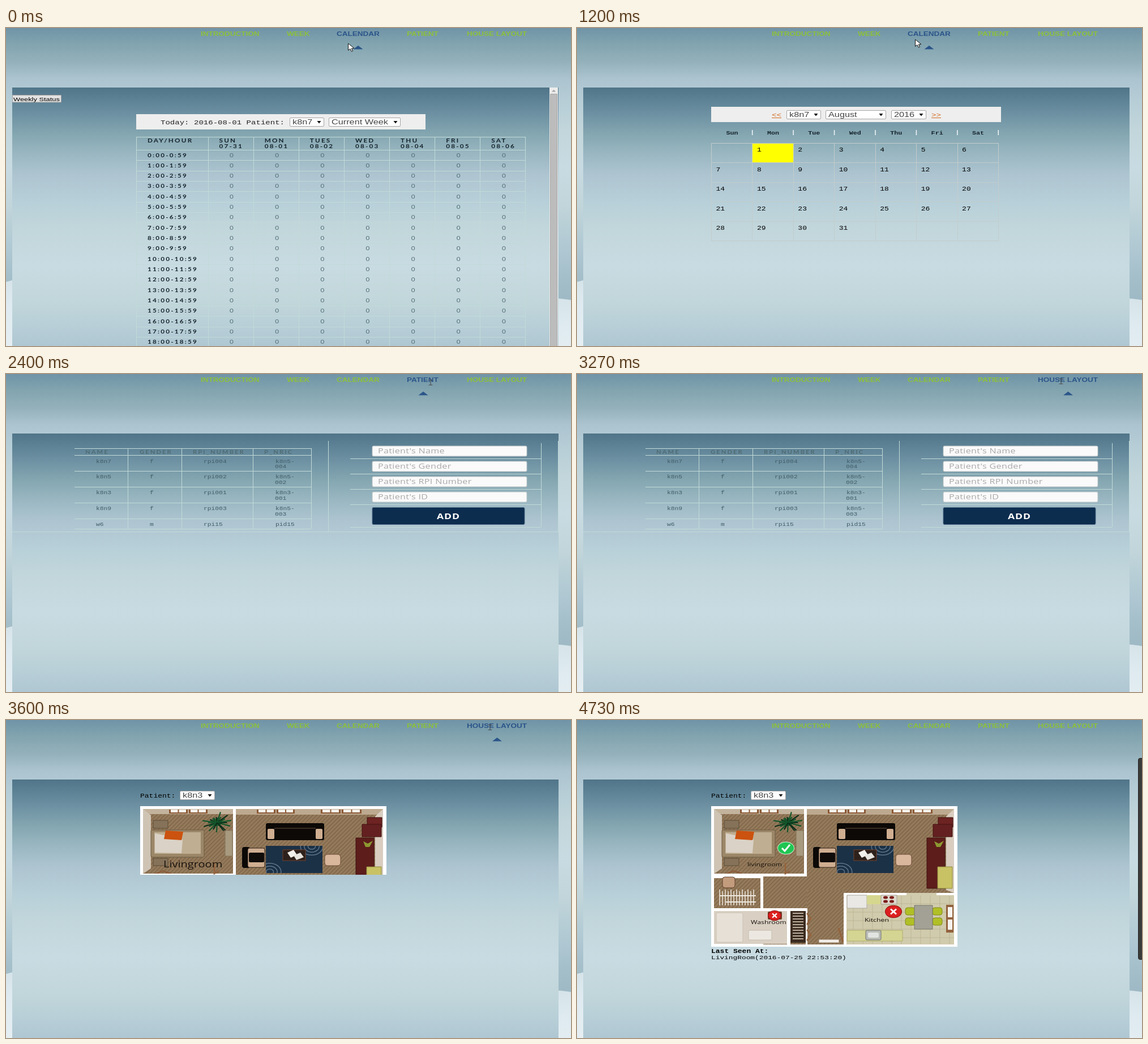
Animation of 998 by 561 pixels, one loop 5060 ms. Source, as an HTML page with a canvas:

```html
<!DOCTYPE html>
<html lang="en">
<head>
<meta charset="utf-8">
<title>Patient monitor</title>
<style>
html, body { margin: 0; width: 100%; height: 100%; overflow: hidden; }
canvas { display: block; width: 998px; height: 561px; }
</style>
</head>
<body>
<canvas id="stage" width="998" height="561"></canvas>
<script>
const ctx = document.getElementById('stage').getContext('2d');
const LOOP = 5060, TICKS_PER_MS = 0.015;
const STRETCH = 1.3;
const SANS = '"Liberation Sans", Arial, sans-serif';
const MONO = '"Liberation Mono", monospace';
const HUMAN = '"Open Sans", sans-serif';
const TABLE = 'Lato, sans-serif';
const LINE = '#c1dad7', SLATE = '#4f6b72', INK = '#14222a';

// Drawing helpers

function text(str, x, y, font, color = '#000', spacing = 0, align = 'left') {
  ctx.save();
  ctx.translate(x, y);
  ctx.scale(STRETCH, 1);
  ctx.font = font;
  ctx.fillStyle = color;
  ctx.letterSpacing = spacing + 'px';
  ctx.textAlign = align;
  ctx.fillText(str, 0, 0);
  ctx.restore();
}

function box(x, y, w, h, fill, stroke, radius = 0) {
  ctx.beginPath();
  ctx.roundRect(x, y, w, h, radius);
  if (fill) { ctx.fillStyle = fill; ctx.fill(); }
  if (stroke) { ctx.strokeStyle = stroke; ctx.lineWidth = 1; ctx.stroke(); }
}

const boxes = list => list.forEach(b => box(...b));

function poly(points, fill, stroke) {
  ctx.beginPath();
  points.forEach(([x, y]) => ctx.lineTo(x, y));
  ctx.closePath();
  if (fill) { ctx.fillStyle = fill; ctx.fill(); }
  if (stroke) { ctx.strokeStyle = stroke; ctx.lineWidth = 1; ctx.stroke(); }
}

function line(color, width, ...points) {
  ctx.beginPath();
  points.forEach(([x, y]) => ctx.lineTo(x, y));
  ctx.strokeStyle = color;
  ctx.lineWidth = width;
  ctx.stroke();
}

function ellipse(x, y, rx, ry, fill) {
  ctx.beginPath();
  ctx.ellipse(x, y, rx, ry, 0, 0, 7);
  ctx.fillStyle = fill;
  ctx.fill();
}

function vertical(stops) {
  const gradient = ctx.createLinearGradient(0, 0, 0, 561);
  stops.forEach(([y, color]) => gradient.addColorStop(y / 561, color));
  return gradient;
}

function select(x, y, w, label) {
  box(x + .5, y + .5, w - 1, 15, '#fff', '#a5a5a5', 1.5);
  text(label, x + 5, y + 12, '12.5px ' + SANS, '#444');
  const ax = x + w - 9;
  poly([[ax - 3.5, y + 6], [ax + 3.5, y + 6], [ax, y + 10.5]], '#111');
}

// Page parts

const sky = vertical([[0, '#7094a7'], [30, '#83a5b0'], [60, '#94b1bb'], [90, '#acc4d0'],
  [130, '#b7ced7'], [180, '#c2d6db'], [245, '#c8dbe2'], [315, '#c1d5da'],
  [355, '#b7ced6'], [400, '#adc6d1'], [450, '#a2bdc8'], [530, '#97b3bf']]);
const panelFill = vertical([[105, '#507589'], [130, '#5f8497'], [160, '#7396a6'],
  [190, '#86a8b2'], [225, '#9bb8c3'], [260, '#aec5d1'], [310, '#b8d0d9'],
  [350, '#c1d6db'], [420, '#c8dbe2'], [485, '#c1d6da'], [525, '#b8cfd8'], [561, '#afc7d2']]);

function cloud(x, top, rx, ry) {
  ctx.save();
  ctx.translate(x, top + ry);
  ctx.scale(rx, ry);
  const glow = ctx.createRadialGradient(0, 0, .4, 0, 0, 1);
  glow.addColorStop(0, '#e7eff2');
  glow.addColorStop(.6, '#dfebf1');
  glow.addColorStop(1, '#d6e4ea');
  ellipse(0, 0, 1, 1, glow);
  ctx.restore();
}

function background() {
  box(0, 0, 998, 561, sky);
  cloud(526, 486, 280, 190);
  cloud(103, 434, 265, 178);
  cloud(932, 475, 300, 199);
}

const links = [['INTRODUCTION', 344, 448], ['WEEK', 496, 536], ['CALENDAR', 584, 660],
  ['PATIENT', 708, 766], ['HOUSE LAYOUT', 814, 921]];

function nav(mouse) {
  for (const [label, left, right] of links) {
    const hover = mouse.y < 38 && mouse.x >= left && mouse.x <= right;
    text(label, left, 13.5, 'bold 10.4px ' + SANS, hover ? '#2b5589' : '#8cc03c');
    const mid = (left + right) / 2;
    if (hover) poly([[mid - 8.5, 37.5], [mid + 8.5, 37.5], [mid, 31]], '#2b5589');
  }
}

function weekView() {
  box(960, 105, 15, 456, '#ececec');
  box(961.5, 116.5, 12, 460, '#bcbcbc', '#a6a6a6');
  poly([[964, 112.5], [971, 112.5], [967.5, 109]], '#a0a0a0');
  box(11.5, 118.5, 86, 12.5, '#e2e2e2', '#a0a0a0');
  text('Weekly Status', 13, 128.5, '9.9px ' + SANS);

  box(230, 152, 511, 27, '#eee');
  text('Today: 2016-08-01 Patient:', 273, 169.5, '10.8px ' + MONO, '#222');
  select(501, 158, 61, 'k8n7');
  select(570, 158, 127, 'Current Week');

  const head = (str, x, y) => text(str, x, y, 'bold 9px ' + TABLE, INK, 1.7);
  const columnX = i => 356.5 + 80.14 * i;
  const rowY = i => Math.round(215 + 18.33 * i) + .5;
  line(LINE, 1, [230, 192.5], [917.5, 192.5]);
  line(LINE, 1, [230.5, 192], [230.5, 561]);
  head('DAY/HOUR', 250, 202);
  ['SUN', 'MON', 'TUES', 'WED', 'THU', 'FRI', 'SAT'].forEach((day, i) => {
    head(day, columnX(i) + 20, 202);
    head(i ? '08-0' + i : '07-31', columnX(i) + 20, 211.5);
  });
  for (let i = 0; i < 8; i++) {
    const x = Math.round(columnX(i)) + .5;
    line(LINE, 1, [x, 192], [x, 561]);
  }
  for (let hour = 0; hour < 19; hour++) {
    line(LINE, 1, [230, rowY(hour)], [917.5, rowY(hour)]);
    const base = 227.5 + 18.33 * hour;
    head(`${hour}:00-${hour}:59`, 250, base);
    for (let i = 0; i < 7; i++)
      text('0', columnX(i) + 42, base, '9px ' + TABLE, SLATE, 0, 'center');
  }
}

function monthView() {
  box(237, 139, 512, 27, '#eee');
  for (const [str, x] of [['<<', 344], ['>>', 626]]) {
    text(str, x, 157, '11px ' + MONO, '#d2691e');
    line('#d2691e', 1, [x, 158.5], [x + 17, 158.5]);
  }
  select(370, 145, 61, 'k8n7');
  select(439, 145, 107, 'August');
  select(555, 145, 62, '2016');

  const columnX = i => 237.5 + 72.43 * i, rowY = i => 203 + 34.5 * i;
  box(310, 203, 72.5, 34.5, '#ff0');
  ['Sun', 'Mon', 'Tue', 'Wed', 'Thu', 'Fri', 'Sat'].forEach((day, i) => {
    text(day, columnX(i) + 36.5, 187.5, 'bold 9px ' + MONO, INK, 0, 'center');
    box(columnX(i + 1) - 1, 180, 1.5, 9, '#f4f8f9');
  });
  for (let i = 0; i < 8; i++) {
    const x = Math.floor(columnX(i)) + .5;
    line('#c3cccb', 1, [x, 203], [x, 375.5]);
  }
  for (let i = 0; i < 6; i++) {
    const y = Math.floor(rowY(i)) + .5;
    line('#c3cccb', 1, [237, y], [745, y]);
  }
  for (let day = 1; day <= 31; day++)
    text(day, columnX(day % 7) + 8, rowY(Math.floor(day / 7)) + 15, '10px ' + MONO);
}

const patients = [['k8n7', 'f', 'rpi004', 'k8n5-', '004'], ['k8n5', 'f', 'rpi002', 'k8n5-', '002'],
  ['k8n3', 'f', 'rpi001', 'k8n3-', '001'], ['k8n9', 'f', 'rpi003', 'k8n5-', '003'],
  ['w6', 'm', 'rpi15', 'pid15', '']];

function patientView() {
  [131.5, 143.5, 171.5, 199.5, 227.5, 255.5, 273.5].forEach(y => line(LINE, 1, [121, y], [539, y]));
  [215.5, 310.5, 436.5, 539.5].forEach(x => line(LINE, 1, [x, 131], [x, 273]));
  [['NAME', 140], ['GENDER', 236], ['RPI_NUMBER', 330], ['P_NRIC', 456]].forEach(([str, x]) =>
    text(str, x, 140.5, 'bold 8.6px ' + TABLE, SLATE, 1.6));
  patients.forEach((row, i) => row.forEach((cell, j) =>
    text(cell, [159, 254, 349, 476, 475][j], 156.5 + 27.9 * i + (j > 3 ? 9.5 : 0),
      '8.7px ' + MONO, '#3f5c66')));

  line(LINE, 1, [569.5, 118], [569.5, 278]);
  line(LINE, 1, [975.5, 118], [975.5, 278]);
  line(LINE, 1, [11, 278.5], [976, 278.5]);
  [149.5, 176.5, 203.5, 230.5, 270.5].forEach(y => line(LINE, 1, [608, y], [945, y]));
  line(LINE, 1, [945.5, 122], [945.5, 270]);
  ['Name', 'Gender', 'RPI Number', 'ID'].forEach((field, i) => {
    const y = 127 + 27 * i;
    box(647, y, 273, 18, '#fafafa', '#b9c0c2', 2);
    text("Patient's " + field, 657, y + 13.3, '12.4px ' + HUMAN, '#a9a9a9', .25);
  });
  box(647, 235.5, 269, 30, '#0d2d4f', '#4d6a84', 2);
  text('ADD', 781.5, 255.5, 'bold 13.5px ' + HUMAN, '#fff', .8, 'center');
}

// Floor plan

function wood(x, y, w, h) {
  ctx.save();
  ctx.beginPath();
  ctx.rect(x, y, w, h);
  ctx.clip();
  box(x, y, w, h, '#947a5b');
  for (let i = x; i < x + w + h; i += 7)
    line('rgba(74,50,28,.28)', 1.5, [i, y], [i - h, y + h]);
  ctx.restore();
}

function windowFrame(x, w) {
  box(x, 158, w, 7, '#8c5a38');
  const pane = w / 2 - 4;
  [x + 3, x + w / 2 + 1].forEach(px => box(px, 158, pane, 5, '#f4f1ea'));
}

function plant(x, y, size) {
  for (let i = 0; i < 28; i++) {
    const angle = i * 2.4, reach = size * (.65 + .35 * Math.sin(i * 5));
    line(i % 3 ? '#14562b' : '#0c2f1a', 2.2, [x, y],
      [x + Math.cos(angle) * reach, y + Math.sin(angle) * reach * .72]);
  }
}

function bedroom() {
  wood(242, 157, 159, 114);
  box(242, 157, 159, 9, '#c3b39c');
  poly([[242, 157], [256, 168], [256, 262], [242, 271]], '#cfc4b4');
  windowFrame(288, 33);
  windowFrame(323, 33);
  boxes([[260, 177, 26, 14, '#857259', '#5d4c38'], [260, 244, 26, 13, '#857259', '#5d4c38'],
    [256, 194, 94, 48, '#9b8768', '#6d5b43', 2], [262, 198, 82, 38, '#bfae92'],
    [387, 195, 13, 45, '#a89a7e', '#83745b']]);
  poly([[263, 200], [284, 204], [312, 211], [310, 235], [263, 234]], '#dad2c6');
  poly([[282, 195], [313, 197], [310, 212], [279, 210]], '#cb520f');
  plant(373, 181, 27);
  line('#8c5a38', 2, [263, 272], [277, 266], [291, 271]);
}

function lounge() {
  wood(406, 157, 260, 150);
  box(406, 157, 260, 10, '#bda98f');
  windowFrame(443, 33);
  windowFrame(478, 32);
  windowFrame(556, 35);
  windowFrame(593, 35);
  poly([[666, 157], [652, 170], [652, 300], [666, 305]], '#d8cdbf');
  boxes([[459, 182, 103, 30, '#0c0907', null, 3], [462, 192, 12, 18, '#cfae91', null, 2],
    [547, 192, 12, 18, '#cfae91', null, 2], [474, 190, 73, 2, '#3a2c22'],
    [417, 224, 14, 37, '#0c0907', null, 4], [427, 226, 30, 34, '#cfae91', '#2b1d14', 3],
    [429, 234, 27, 17, '#100c0a', null, 2], [459, 222, 100, 48, '#1b3146']]);
  ctx.save();
  ctx.beginPath();
  ctx.rect(459, 222, 100, 48);
  ctx.clip();
  for (const [x, y] of [[466, 268], [540, 223]])
    for (const r of [6, 12, 18]) {
      ctx.beginPath();
      ctx.ellipse(x, y, r * 1.1, r * .85, 0, 0, 7);
      ctx.strokeStyle = '#5d7388';
      ctx.lineWidth = 1.5;
      ctx.stroke();
    }
  ctx.restore();
  box(489, 229, 40, 19, '#2e211b', '#73402a');
  poly([[497, 234], [508, 229], [514, 238], [503, 243]], '#f1f0ec');
  poly([[508, 239], [520, 234], [526, 242], [513, 247]], '#e6e4df');
  boxes([[563, 237, 28, 20, '#d8b79c', '#6b4a36', 5], [618, 208, 32, 89, '#5c1d1b', '#3d100f'],
    [638, 172, 26, 17, '#6d2322', '#431111'], [629, 184, 34, 22, '#642020', '#431111'],
    [637, 259, 26, 38, '#c9c264', '#8f893d']]);
  poly([[631, 214], [639, 218], [648, 213], [642, 224], [635, 224]], '#8d9930');
}

function lowerRooms() {
  wood(242, 279, 82, 53);
  wood(329, 275, 143, 121);
  wood(406, 300, 66, 96);
  box(257, 277, 22, 19, '#c39b7d', '#5f402c', 4);
  for (let x = 252; x < 316; x += 5) line('#eee8df', 1.5, [x, 299 + x % 2 * 3], [x, 327]);
  line('#eee8df', 2, [252, 310], [316, 310]);
  line('#eee8df', 2, [263, 321], [316, 321]);

  boxes([[237, 271, 169, 5, '#fff'], [401, 152, 5, 124, '#fff'], [324, 275, 5, 61, '#fff'],
    [237, 332, 170, 5, '#fff'], [242, 337, 130, 58, '#d9d0c3'], [246, 340, 47, 52, '#e6e0d7', '#cbc0b1', 2],
    [303, 371, 41, 17, '#ece8e1', '#c5bbad', 2], [337, 338, 25, 14, '#70402c', null, 2],
    [371, 336, 6, 60, '#fff'], [377, 337, 27, 56, '#3c2c20'], [404, 336, 3, 60, '#fff']]);
  for (let y = 341; y < 391; y += 5) line('#b9ad9c', 2, [381, y], [400, y]);
  line('#95623b', 2.5, [406, 341], [413, 350], [406, 361]);
  line('#95623b', 2.5, [406, 370], [413, 379], [406, 389]);
  line('#95623b', 2.5, [368, 252], [368, 271], [376, 266]);
  line('#95623b', 2.5, [462, 367], [470, 392]);
  box(427, 387, 36, 6, '#f2eee8', '#8c7357');
}

function kitchen() {
  box(472, 305, 194, 91, '#d1cbad');
  for (let x = 488; x < 666; x += 17) line('#bdb797', 1, [x, 310], [x, 395]);
  for (let y = 324; y < 395; y += 15) line('#bdb797', 1, [477, y], [666, y]);
  boxes([[471, 305, 111, 4, '#fff'], [635, 305, 37, 4, '#fff'], [471, 305, 5, 92, '#fff'],
    [477, 309, 35, 23, '#e9e8e5', '#aaa89f'], [512, 309, 25, 16, '#d6d78f'],
    [537, 309, 28, 16, '#ded8cd', '#a29c90'], [477, 371, 98, 19, '#d5d593', '#b0ae6c'],
    [510, 371, 27, 17, '#b9bbb5', '#6f7370', 2], [514, 375, 19, 9, '#e2e4e1', null, 2],
    [652, 326, 13, 49, '#93623d'], [655, 330, 8, 18, '#f6f4ef'], [655, 352, 8, 18, '#f6f4ef']]);
  for (const x of [545, 556]) for (const y of [313, 320]) ellipse(x, y, 4, 2.6, '#7c1d19');
  for (const x of [580, 628]) for (const y of [331, 349])
    box(x, y, 17, 13, '#b1bf27', '#808b17', 4);
  box(596, 327, 32, 42, '#a3a195', '#77766b');
}

function badge(x, y, rx, color, ok) {
  const ry = rx * .74, s = rx / 14;
  ellipse(x, y, rx + 1, ry + 1, ok ? '#c9efd3' : '#8f1110');
  ellipse(x, y, rx, ry, color);
  if (ok) return line('#fff', 3, [x - 7, y], [x - 2, y + 5], [x + 7, y - 6]);
  for (const d of [-1, 1]) line('#fff', 3 * s, [x - 5 * s, y - 4.5 * s * d], [x + 5 * s, y + 4.5 * s * d]);
}

function houseView(complete) {
  text('Patient:', 237, 137, '10px ' + MONO);
  select(307, 125, 62, 'k8n3');
  ctx.save();
  ctx.beginPath();
  ctx.rect(237, 152, 435, complete ? 248 : 121);
  ctx.clip();
  box(237, 152, 435, 248, '#fff');
  bedroom();
  lounge();
  lowerRooms();
  kitchen();
  ctx.restore();
  if (!complete) return text('Livingroom', 278, 259.5, '15.4px ' + HUMAN, '#17120d');

  const label = (str, x, y) => text(str, x, y, '9.5px ' + HUMAN, '#17120d');
  badge(369, 226, 14, '#20c552', true);
  badge(349, 345, 11, '#dc1f1f');
  badge(559, 338, 14, '#dc1f1f');
  label('livingroom', 301, 258);
  label('Washroom', 307, 359.5);
  label('Kitchen', 508, 356);
  text('Last Seen At:', 237, 411, 'bold 10px ' + MONO);
  text('LivingRoom(2016-07-25 22:53:20)', 237, 421.5, '9.9px ' + MONO);
}

// Pointer: [tick, x, y], straight moves between stops

const stops = [[0, 604, 27], [5, 502, 172], [6, 502, 172], [14, 597, 20], [21, 597, 20],
  [26, 749, 16], [28, 749, 16], [29, 750, 15], [41, 750, 15], [49, 855, 13], [52, 855, 13],
  [53, 853, 12], [54, 855, 13], [58, 855, 13], [66, 1012, 612], [76, 1012, 612]];

function pointerAt(tick) {
  const i = Math.max(1, stops.findIndex(stop => stop[0] >= tick));
  const [t0, x0, y0] = stops[i - 1], [t1, x1, y1] = stops[i];
  const p = (tick - t0) / (t1 - t0);
  return { x: x0 + (x1 - x0) * p, y: y0 + (y1 - y0) * p };
}

function pointer({ x, y }, beam) {
  if (beam) {
    line('#4a4f52', 1, [x - 3.5, y - 4.5], [x + 3.5, y - 4.5]);
    line('#4a4f52', 1, [x - 3.5, y + 4.5], [x + 3.5, y + 4.5]);
    line('#4a4f52', 1.2, [x, y - 4.5], [x, y + 4.5]);
    return;
  }
  const arrow = [[0, 0], [0, 12], [3.4, 9.4], [5.8, 14], [8, 13.2], [5.8, 8.8], [10.5, 8.5]];
  poly(arrow.map(([dx, dy]) => [x + .5 + dx, y + .3 + dy]), '#fff', '#111');
}

function draw(now) {
  const tick = Math.floor((now % LOOP + 5) * TICKS_PER_MS);
  const within = (from, to) => tick >= from && tick < to;
  const mouse = pointerAt(tick);
  background();
  nav(mouse);
  if (tick !== 53) {
    box(11, 105, 965, 456, panelFill);
    if (tick < 18) weekView();
    else if (tick < 35) monthView();
    else if (tick < 53) patientView();
    else houseView(tick > 54);
  }
  if (tick >= 71) box(991.5, 67.5, 20, 355, '#3b3b39', '#232322', 3);
  pointer(mouse, within(36, 42) || within(49, 53) || within(54, 59));
  requestAnimationFrame(() => draw(performance.now() - start));
}

const start = performance.now();
draw(0);
</script>
</body>
</html>
```
